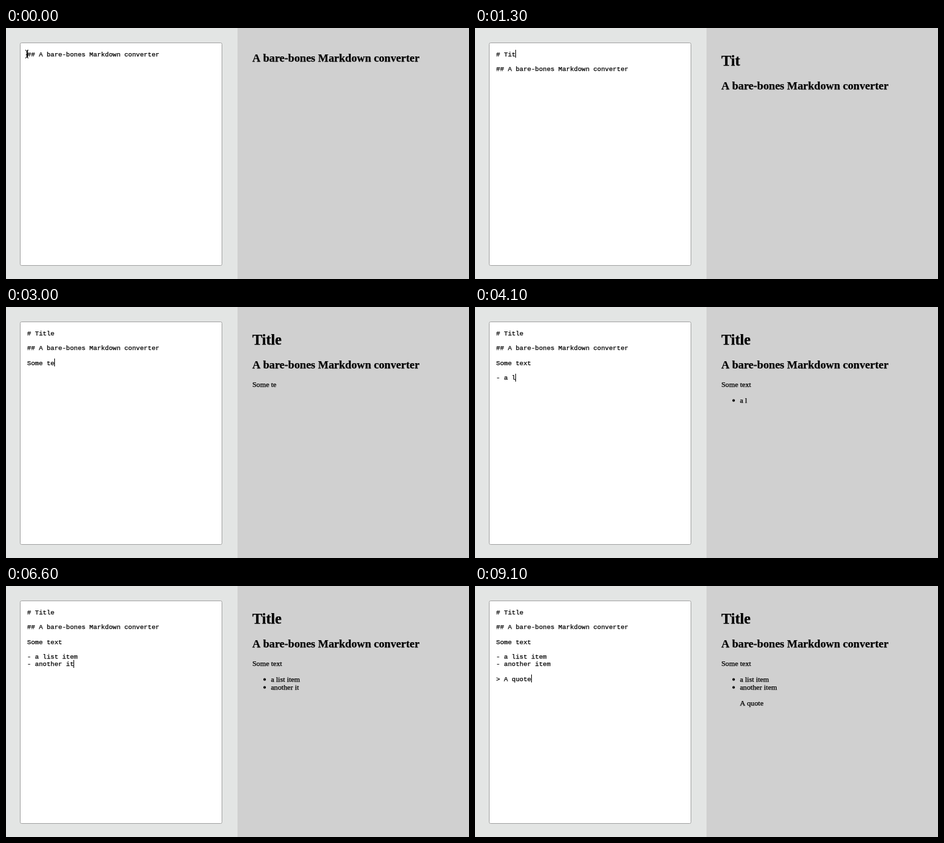
Recreate the animation shown at these times as an HTML page with a canvas. Size 700 px wide and 380 px high, loop 9.2 s.

```html
<!DOCTYPE html>
<html lang="en">
<head>
<meta charset="utf-8">
<title>Markdown converter</title>
<style>
  html, body { margin: 0; width: 100%; height: 100%; overflow: hidden; }
  canvas { display: block; width: 700px; height: 380px; }
</style>
</head>
<body>
<canvas id="stage" width="700" height="380"></canvas>
<script>
const ctx = document.getElementById('stage').getContext('2d');
const LOOP = 9200, STEP = 100;
const START_TEXT = '## A bare-bones Markdown converter';
const MONO = '9.8px "Liberation Mono", monospace';
const SERIF = '"Liberation Serif", serif';
const EM = 11.2, COLUMN = 5.88, ROW = 11.2;

// Editing script: each entry inserts a key or moves the caret.
const edits = [];
const type = (at, text, gap = STEP) =>
  [...text].forEach((key, i) => edits.push({ at: at + i * gap, key }));
const moveTo = (at, pos) => edits.push({ at, pos });

type(400, '\n\n');
moveTo(600, 1);
moveTo(700, 0);
type(900, '# Title');
moveTo(1700, 8);
moveTo(1800, 16);
moveTo(1900, 43);
type(2000, '\n\n');
type(2300, 'Some t');
type(3000, 'ext', 50);
type(3300, '\n\n');
type(3600, '- ');
type(3900, 'a list item');
type(5500, '\n');
type(5800, '- another it', 72);
type(6700, 'em');
type(7000, '\n\n');
type(7600, '> A quote');

function editorAt(time) {
  let text = START_TEXT, pos = 0;
  for (const edit of edits) {
    if (edit.at > time) break;
    if (edit.key) {
      text = text.slice(0, pos) + edit.key + text.slice(pos);
      pos++;
    } else {
      pos = edit.pos;
    }
  }
  return { text, pos };
}

// Text with a hairline outline, for slightly heavier strokes.
function drawText(content, x, y, outline) {
  ctx.fillStyle = ctx.strokeStyle = '#000';
  ctx.lineWidth = outline;
  ctx.fillText(content, x, y);
  ctx.strokeText(content, x, y);
}

function drawEditor({ text, pos }, time) {
  ctx.fillStyle = '#e3e5e4';
  ctx.fillRect(0, 0, 350, 380);
  ctx.beginPath();
  ctx.roundRect(21.5, 22.5, 305, 337, 2);
  ctx.fillStyle = '#fff';
  ctx.fill();
  ctx.strokeStyle = '#a6a6a6';
  ctx.lineWidth = 1;
  ctx.stroke();

  ctx.font = MONO;
  text.split('\n').forEach((line, i) =>
    drawText(line, 32, Math.round(43 + i * ROW), 0.25));

  const before = text.slice(0, pos).split('\n');
  const row = before.length - 1;
  const caretHidden = time >= 8900 && time < 9100;
  if (!caretHidden) {
    const x = Math.floor(32.2 + before[row].length * COLUMN);
    ctx.fillStyle = '#111';
    ctx.fillRect(x, Math.round(33.4 + row * ROW), 1, 12);
  }
  if (time < 400) drawPointer();
}

function drawPointer() {
  ctx.strokeStyle = '#111';
  ctx.lineWidth = 1;
  ctx.beginPath();
  ctx.moveTo(29, 33.5);
  ctx.quadraticCurveTo(31.5, 33.5, 31.5, 36);
  ctx.lineTo(31.5, 43);
  ctx.quadraticCurveTo(31.5, 45.5, 29, 45.5);
  ctx.moveTo(34, 33.5);
  ctx.quadraticCurveTo(31.5, 33.5, 31.5, 36);
  ctx.moveTo(31.5, 43);
  ctx.quadraticCurveTo(31.5, 45.5, 34, 45.5);
  ctx.moveTo(30, 40.5);
  ctx.lineTo(33, 40.5);
  ctx.stroke();
}

function drawPreview(text) {
  ctx.fillStyle = '#d0d0d0';
  ctx.fillRect(350, 0, 350, 380);

  let y = 22, margin = 0, inList = false;

  // Lays out one line with collapsing margins and returns its baseline.
  function place(content, x, size, gap, weight, leading) {
    y += Math.max(margin, gap);
    const baseline = Math.round(y + 0.891 * size);
    ctx.font = `${weight} ${size}px ${SERIF}`;
    drawText(content, x, baseline, 0.25);
    y += leading * size;
    margin = gap;
    return baseline;
  }
  const body = (content, x) => place(content, x, EM, EM, 'normal', 1.125);

  function heading(content, scale, gapScale) {
    const size = EM * scale, gap = size * gapScale;
    if (content) place(content, 372.4, size, gap, 'bold', 1.15);
    else margin = Math.max(margin, gap);
  }

  function item(content) {
    if (inList) y -= EM;
    const baseline = body(content, 400.4);
    ctx.beginPath();
    ctx.arc(391, baseline - 3.5, 1.9, 0, Math.PI * 2);
    ctx.fill();
    inList = true;
  }

  for (const raw of text.split('\n')) {
    const line = raw.trim();
    if (line.startsWith('##')) heading(line.slice(2).trim(), 1.5, 0.83);
    else if (line.startsWith('#')) heading(line.slice(1).trim(), 2, 0.67);
    else if (line.startsWith('- ') || (line === '-' && inList)) item(line.slice(2));
    else if (line.startsWith('>')) {
      if (line.length > 1) body(line.slice(1).trim(), 400.4);
    } else if (line) body(line, 372.4);
  }
}

function draw(now) {
  const time = Math.floor((now % LOOP) / STEP) * STEP;
  const editor = editorAt(time);
  drawEditor(editor, time);
  drawPreview(editor.text);
}

function tick() {
  draw(performance.now() - start);
  requestAnimationFrame(tick);
}

const start = performance.now();
tick();
</script>
</body>
</html>
```
